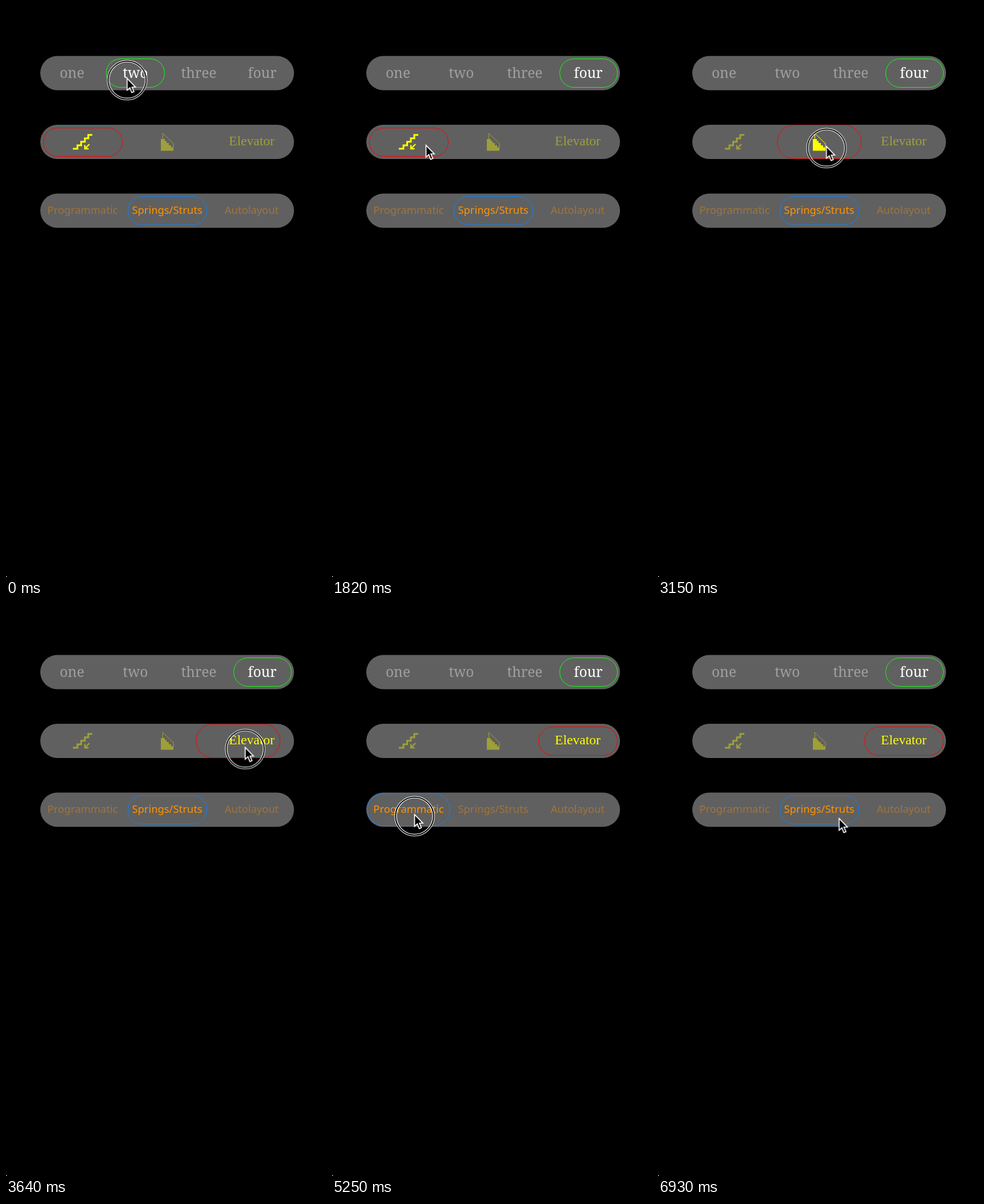
Animation, 560 px wide and 1000 px high, one loop 7 s. Source, as an HTML page:

```html
<!DOCTYPE html>
<html lang="en">
<head>
<meta charset="utf-8">
<title>Segmented controls</title>
<style>
  html, body { margin: 0; width: 100%; height: 100%; overflow: hidden; background: #000; }
  svg, .seg, .pointer { position: absolute; left: 0; top: 0; }

  /* All tracks share one 7 s loop, so 1% is 70 ms. */
  .item, .seg, .pill, .pointer, .ring { animation: 7s linear infinite; }

  .item { opacity: .4; }
  .row1 { font: 300 24.5px "Noto Serif", serif; fill: #fff; }
  .row2 { font: 23.6px "Liberation Serif", serif; fill: #ff0; stroke: #ff0; stroke-width: 0; }
  .row3 { font: 18.4px "Noto Sans", sans-serif; fill: #ff9300; }
  text { text-anchor: middle; }

  .seg { left: 60px; width: 148px; height: 60px; }
  .pill { position: absolute; inset: 4.5px; box-sizing: border-box; border: 1.6px solid; border-radius: 30px; }
  .seg1 { top: 87.5px; width: 111px; color: #1f1; animation-name: move1; }
  .seg2 { top: 208px; color: #f00; animation-name: move2; }
  .seg3 { top: 328.5px; color: #0a84ff; animation-name: move3; }
  .seg1 .pill { animation-name: grow1; }
  .seg2 .pill { animation-name: grow2; }
  .seg3 .pill { animation-name: grow3; }

  @keyframes move1 {
    0%, 1% { transform: translateX(111px); }
    5%, 17.5% { transform: none; animation-timing-function: ease-in-out; }
    21.5%, 100% { transform: translateX(333px); }
  }
  @keyframes grow1 {
    0% { inset: 4.5px; }
    2%, 6% { inset: .3px; }
    9%, 100% { inset: 4.5px; }
  }
  @keyframes move2 {
    0%, 28% { transform: none; }
    30.3% { transform: translateX(74px); }
    33% { transform: translateX(87px); }
    35.5% { transform: translateX(127px); }
    36% { transform: translateX(129px); animation-timing-function: ease-out; }
    39%, 45% { transform: translateX(148px); }
    52% { transform: translateX(272px); }
    54.5% { transform: translateX(284px); animation-timing-function: ease-in-out; }
    58%, 100% { transform: translateX(296px); }
  }
  @keyframes grow2 {
    0%, 26.5% { inset: 4.5px; }
    28.5%, 35.3% { inset: .3px; }
    36% { inset: 1.7px; }
    39%, 42.5% { inset: 4.5px; }
    44.5%, 54.5% { inset: .3px; }
    58%, 100% { inset: 4.5px; }
  }
  @keyframes move3 {
    0%, 63% { transform: translateX(148px); }
    66% { transform: translateX(51px); }
    69%, 76% { transform: none; }
    77% { transform: translateX(6px); }
    80% { transform: translateX(74px); }
    82.5%, 83% { transform: translateX(131px); animation-timing-function: ease-in-out; }
    87%, 100% { transform: translateX(148px); }
  }
  @keyframes grow3 {
    0%, 61.5% { inset: 4.5px; }
    63.5%, 70% { inset: .5px; }
    72.5%, 73.5% { inset: 4.5px; }
    75.5%, 83% { inset: .5px; }
    87%, 100% { inset: 4.5px; }
  }

  /* Labels brighten when the pill crosses into their segment. */
  .one { animation-name: one; }
  .two { animation-name: two; }
  .four { animation-name: four; }
  .down { animation-name: down; }
  .rail { animation-name: rail; }
  .lift { animation-name: lift; }
  .code { animation-name: code; }
  .struts { animation-name: struts; }
  @keyframes one { 0%, 3% { opacity: .4; } 6%, 17.5% { opacity: 1; } 20.5%, 100% { opacity: .4; } }
  @keyframes two { 0%, 3% { opacity: 1; } 6%, 100% { opacity: .4; } }
  @keyframes four { 0%, 17.5% { opacity: .4; } 20.5%, 100% { opacity: 1; } }
  @keyframes down { 0%, 30% { opacity: 1; } 33%, 100% { opacity: .4; } }
  @keyframes rail { 0%, 30% { opacity: .4; } 33%, 49% { opacity: 1; } 52%, 100% { opacity: .4; } }
  @keyframes lift { 0%, 49% { opacity: .4; } 52%, 100% { opacity: 1; } }
  @keyframes code { 0%, 64.5% { opacity: .4; } 67.5%, 80% { opacity: 1; } 83%, 100% { opacity: .4; } }
  @keyframes struts { 0%, 64.5% { opacity: 1; } 67.5%, 80% { opacity: .4; } 83%, 100% { opacity: 1; } }

  .pointer { overflow: visible; animation-name: point; }
  .ring { fill: none; animation-name: press; animation-timing-function: step-end; }
  @keyframes point {
    0%, 1% { transform: translate(211.5px, 126px); }
    5%, 7% { transform: translate(100px, 124px); }
    11% { transform: translate(402px, 113px); }
    12%, 13% { transform: translate(533.5px, 108.5px); }
    16%, 18% { transform: translate(450px, 125px); }
    22% { transform: translate(385px, 175px); }
    26%, 28% { transform: translate(164px, 243px); }
    30.3% { transform: translate(238px, 244px); }
    33% { transform: translate(251px, 244px); }
    35.5%, 41% { transform: translate(291px, 244.5px); }
    42%, 45% { transform: translate(294px, 245px); }
    52% { transform: translate(418px, 248.5px); }
    54.5%, 56% { transform: translate(430px, 249px); }
    61%, 63% { transform: translate(274px, 362px); }
    66% { transform: translate(177.5px, 364px); }
    69%, 70% { transform: translate(126px, 367px); }
    73%, 76% { transform: translate(144px, 366px); }
    77% { transform: translate(150px, 366px); }
    80% { transform: translate(218px, 361px); }
    82.5%, 91% { transform: translate(275px, 356.5px); }
    99%, 100% { transform: translate(316.5px, 373px); }
  }
  @keyframes press {
    0%, 16%, 26.5%, 42%, 61.5%, 73.5% { opacity: 1; }
    6%, 18%, 35.5%, 54.5%, 70%, 82.5%, 100% { opacity: 0; }
  }
</style>
</head>
<body>
<svg width="560" height="1000">
  <g fill="#606060">
    <rect x="60" y="87.5" width="444" height="60" rx="30"/>
    <rect x="60" y="208" width="444" height="60" rx="30"/>
    <rect x="60" y="328.5" width="444" height="60" rx="30"/>
  </g>
  <g class="row1">
    <text class="item one" x="115.5" y="126">one</text>
    <text class="item two" x="226.5" y="126">two</text>
    <text class="item" x="337.5" y="126">three</text>
    <text class="item four" x="448.5" y="126">four</text>
  </g>
  <g class="row2">
    <g class="item down" fill="none">
      <path stroke-width="3" d="M117 250H125V244H131.5V237.7H138V231.7H144V225.8H151"/>
      <path stroke-width="2.4" d="M146 242L138.5 249.5M138 243.5V250H144.5"/>
    </g>
    <g class="item rail">
      <path d="M271 233H278V236.5H281V240H285V244H289V247.5H293V253.5H271Z"/>
      <path fill="none" stroke-width="1" d="M274.3 233V223L293 241V248"/>
    </g>
    <text class="item lift" x="430" y="244">Elevator</text>
  </g>
  <g class="row3">
    <text class="item code" x="134" y="363.5">Programmatic</text>
    <text class="item struts" x="282" y="363.5">Springs/Struts</text>
    <text class="item" x="430" y="363.5">Autolayout</text>
  </g>
  <path fill="#fff" d="M0 998L2 1000H0Z"/>
</svg>
<div class="seg seg1"><div class="pill"></div></div>
<div class="seg seg2"><div class="pill"></div></div>
<div class="seg seg3"><div class="pill"></div></div>
<svg class="pointer" width="20" height="30">
  <g class="ring">
    <circle cx=".5" cy="3.7" r="33.2" stroke="#fff" stroke-width="4.2"/>
    <circle cx=".5" cy="3.7" r="33.3" stroke="#000" stroke-width="2"/>
  </g>
  <path fill="#000" stroke="#fff" stroke-width="1.7" d="M.5 .8V21.6L5.4 17.2L8.6 25.6L12.4 24.1L9 16H15Z"/>
</svg>
</body>
</html>
```
